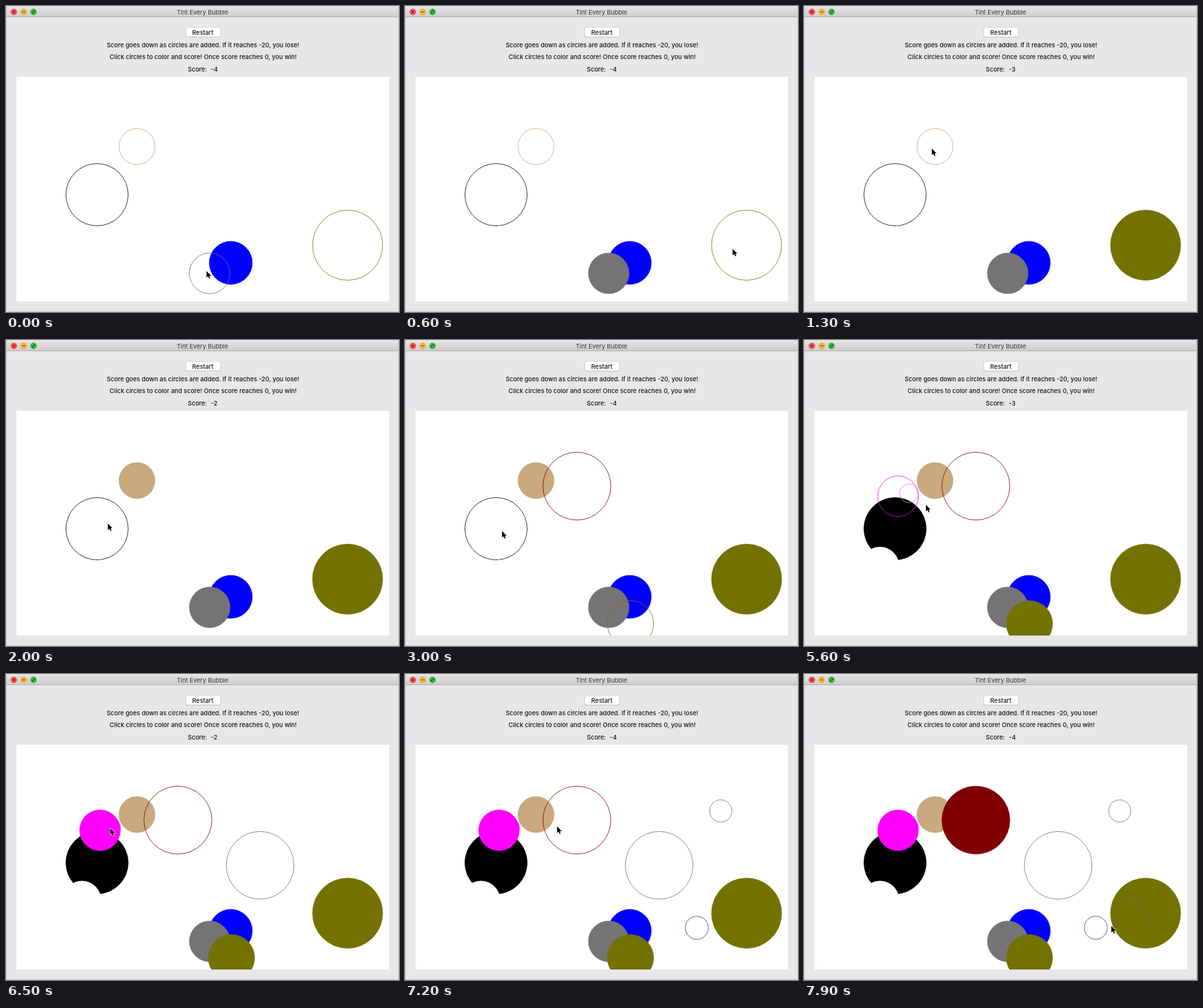
An HTML page for the animation above (8000 ms loop, 600 by 467 pixels).

```html
<!DOCTYPE html>
<html lang="en">
<head>
<meta charset="utf-8">
<title>Tint Every Bubble</title>
<style>
  html, body { margin: 0; width: 100%; height: 100%; overflow: hidden; background: #e8e6e8; }
  svg { display: block; width: 600px; height: 467px; }
  text { font: 500 9.45px Inter, Roboto, sans-serif; fill: #161616; }
  .mid { text-anchor: middle; }
  .title { font-weight: 400; fill: #3b393b; }
</style>
</head>
<body>
<svg viewBox="0 0 600 467">
  <defs>
    <linearGradient id="bar" x2="0" y2="1">
      <stop stop-color="#e6e4e6"/>
      <stop offset="1" stop-color="#cecbce"/>
    </linearGradient>
    <clipPath id="area"><path d="M16 108H585V451H16Z"/></clipPath>
  </defs>

  <rect width="600" height="467" fill="#e8e6e8"/>
  <rect width="600" height="17" fill="url(#bar)"/>
  <path d="M0 16.5H600" stroke="#b1aeb1"/>
  <path d="M.5 0V467M599.5 0V467M0 466.5H600" stroke="#c6c4c6"/>

  <g stroke-width=".6">
    <circle cx="12" cy="9" r="4.5" fill="#f9514b" stroke="#d93c36"/>
    <circle cx="27" cy="9" r="4.5" fill="#fab72c" stroke="#d99a22"/>
    <circle cx="42" cy="9" r="4.5" fill="#32c03c" stroke="#239f2b"/>
  </g>
  <path d="M10.2 7.2L13.8 10.8M13.8 7.2L10.2 10.8" stroke="#6b0a06"/>
  <path d="M24.2 9H29.8" stroke="#8a4b04" stroke-width="1.2"/>
  <path d="M41.3 6.7H44.3V9.7ZM39.7 8.3V11.3H42.7Z" fill="#0a5a10"/>
  <text class="mid title" x="300" y="12.6">Tint Every Bubble</text>

  <rect x="274" y="33" width="54" height="15" rx="3" fill="#bcbabc"/>
  <rect x="274.5" y="32.8" width="53" height="14.4" rx="2.8" fill="#fff" stroke="#c9c7c9" stroke-width=".6"/>
  <text class="mid" x="300.5" y="43.5">Restart</text>
  <text class="mid" x="300.7" y="63.4">Score goes down as circles are added. If it reaches -20, you lose!</text>
  <text class="mid" x="301" y="81.4">Click circles to color and score! Once score reaches 0, you win!</text>
  <text x="277.6" y="99.5">Score:</text>
  <text x="312.8" y="99.5" id="score">-4</text>

  <rect x="16" y="108" width="569" height="343" fill="#fff"/>
  <g id="board" clip-path="url(#area)" stroke-width=".8"></g>
  <path id="cursor" d="M.2 .6V10.6L2.5 8.5L4 12L5.7 11.2L4.2 7.9H7.2Z"
        fill="#000" stroke="#fff" stroke-width="1.1" paint-order="stroke" stroke-linejoin="round"/>
</svg>
<script>
const LOOP = 8000, STEP = 100;

// x, y, radius, color, time added, time colored
const circles = [
  [200, 214.5, 27.5, '#c9a97d', 0, 1500],
  [139, 288, 47.5, '#000', 0, 3100],
  [343.2, 392, 32.8, '#00f', 0, 0],
  [311, 408, 31, '#757375', 0, 100],
  [521.5, 365, 53.5, '#737200', 0, 800],
  [116, 345, 29, '#fff', 500, 4100],
  [262.4, 223, 51.8, '#800000', 2400, 7400],
  [344.2, 433, 35.3, '#737200', 2800, 5100],
  [160.5, 234, 14.5, '#d77be0', 4200, 6000],
  [143.5, 238.5, 31, '#f0f', 5300, 6300],
  [388, 292, 51.7, '#757375', 5700, LOOP],
  [445.5, 387.3, 17.6, '#6e1a6e', 6700, LOOP],
  [482, 209, 17, '#757375', 7200, LOOP],
  [500, 367, 25, '#66655c', 7700, LOOP]
];

// time, x, y
const path = [
  [0, 306, 404], [200, 306, 404], [600, 500, 370], [1000, 500, 370],
  [1300, 195, 217], [1700, 195, 217], [2100, 148, 291], [3200, 148, 291],
  [3700, 122, 329], [4400, 122, 329], [4800, 344, 412], [5200, 344, 412],
  [5600, 186, 251], [5900, 159, 235], [6500, 159, 235], [7000, 232, 232],
  [7600, 232, 232], [7900, 469, 384]
];

const $ = id => document.getElementById(id);
const board = $('board'), score = $('score'), cursor = $('cursor');

const nodes = circles.map(([x, y, r, color]) => {
  const c = document.createElementNS('http://www.w3.org/2000/svg', 'circle');
  const attrs = { cx: x, cy: y, r, stroke: color };
  for (const k in attrs) c.setAttribute(k, attrs[k]);
  return board.appendChild(c);
});

const ease = p => p * p * (3 - 2 * p);

function pointer(t) {
  const i = path.findIndex(p => p[0] > t);
  if (i < 0) return path[path.length - 1].slice(1);
  const [t0, x0, y0] = path[i - 1], [t1, x1, y1] = path[i];
  const p = ease((t - t0) / (t1 - t0));
  return [x0 + (x1 - x0) * p, y0 + (y1 - y0) * p];
}

function draw(t) {
  let open = 0;
  circles.forEach(([, , , color, added, colored], i) => {
    const shown = t >= added, full = t >= colored;
    nodes[i].setAttribute('visibility', shown ? 'visible' : 'hidden');
    nodes[i].setAttribute('fill', full ? color : 'none');
    if (shown && !full) open++;
  });
  score.textContent = -open;
  cursor.setAttribute('transform', `translate(${pointer(t)})`);
}

const start = performance.now();
function tick() {
  const t = (performance.now() - start) % LOOP;
  draw(Math.floor(t / STEP) * STEP);
  requestAnimationFrame(tick);
}
tick();
</script>
</body>
</html>
```
